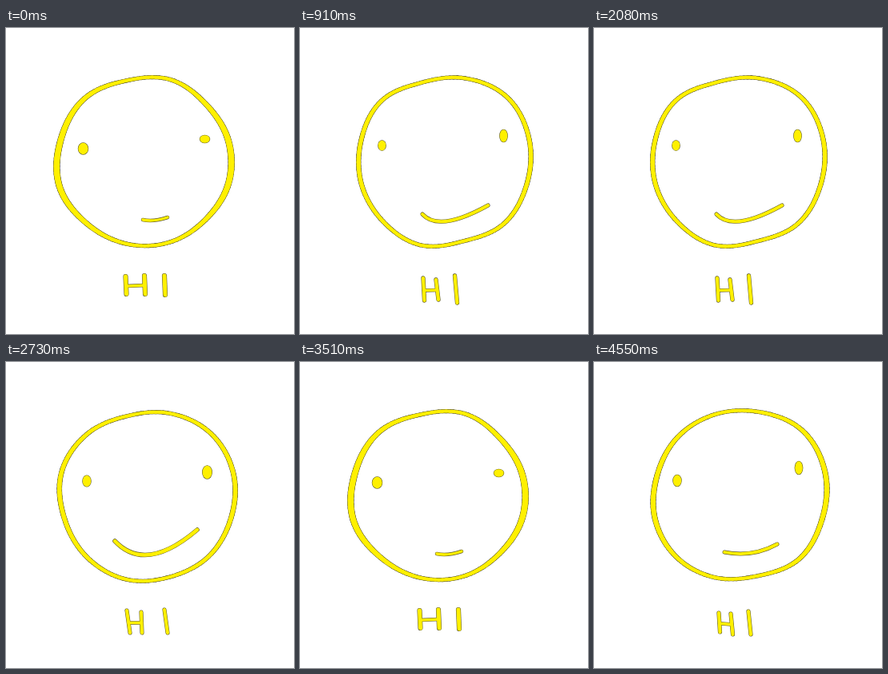
Animation of 360 by 383 pixels, one loop 4680 ms. Source, as an HTML page with a canvas:

```html
<!DOCTYPE html>
<html lang="en">
<head>
<meta charset="utf-8">
<title>Hi</title>
<style>
  html, body { margin: 0; width: 100%; height: 100%; overflow: hidden; background: #fff; }
  canvas { display: block; }
</style>
</head>
<body>
<canvas id="stage" width="360" height="383" role="img" aria-label="Smiling face saying HI"></canvas>
<script>
const ctx = document.getElementById('stage').getContext('2d');
const STEP = 130;
const CENTER = { x: 178, y: 168 };
const FIRST_BEARING = Math.PI / 12;
const YELLOW = '#fff000', EDGE = '#5e5a2c', EDGE_WIDTH = 1.1;

// radii: head outline at equal bearings, clockwise on screen
// eyes: x, y, rx, ry; mouth: start, control, end; stems: x, y, dx, dy
// pen: extra width on the head's flanks, mouth width, letter width
const calm = {
  radii: [103.5, 101.2, 103.6, 105.7, 108.7, 115.2, 113, 112.8, 105.8, 107, 102.2, 103.5],
  eyes: [96.5, 151, 6.2, 7.2, 248.5, 139, 6.2, 4.8],
  mouth: [171, 240, 184, 243, 202, 237],
  stems: [149.5, 311, 1, 22, 173, 310, 1, 23, 198, 310, 1, 24],
  pen: [3.3, 3.4, 5]
};
const grin = {
  radii: [106.8, 106.5, 104.5, 107.7, 108.2, 108.6, 112.6, 109.3, 103.8, 107.2, 110.8, 110],
  eyes: [101, 149, 5.2, 7, 251.5, 138, 5.9, 8.2],
  mouth: [136, 224, 174.5, 265, 239, 210],
  stems: [151, 311, 4, 28, 169, 313, 1, 26, 198, 310, 4, 29],
  pen: [1.5, 4.4, 4]
};
const smile = {
  radii: [109, 108.7, 102.2, 107.3, 104.8, 104.8, 105.2, 108.2, 103, 108.8, 114.8, 112.2],
  eyes: [102.5, 147, 4.8, 6.3, 254.5, 135, 4.8, 7.8],
  mouth: [153, 233, 174, 256, 235, 222],
  stems: [154, 313, 1.5, 28, 170, 315, 3, 25, 193.5, 310, 3, 34],
  pen: [1.2, 4, 4.2]
};
const smirk = {
  radii: [110.9, 111, 103.2, 105.2, 106.8, 105.5, 102.4, 104.2, 105.8, 109.2, 116.5, 114.8],
  eyes: [104, 148.5, 5.2, 7.2, 256, 132.5, 4.8, 8.2],
  mouth: [163, 238, 198, 245, 229, 228],
  stems: [156, 314, 1.5, 24, 171, 315, 2.5, 26, 193, 312, 3, 29],
  pen: [2, 3.8, 4.1]
};

function mix(a, b, t, lift = 0) {
  const pose = { lift };
  for (const key in a) pose[key] = a[key].map((v, i) => v + (b[key][i] - v) * t);
  return pose;
}

const poses = [
  calm,
  mix(calm, grin, 1 / 3, 5),
  mix(calm, grin, 2 / 3),
  grin,
  mix(grin, smile, 1 / 4),
  mix(grin, smile, 1 / 2),
  mix(grin, smile, 3 / 4),
  smile,
  smirk
];

// Catmull-Rom through a closed list of values
function sampleLoop(values, position) {
  const n = values.length, i = Math.floor(position), t = position - i;
  const [a, b, c, d] = [-1, 0, 1, 2].map(k => values[(i + k + n) % n]);
  return b + t / 2 * (c - a + t * (2 * a - 5 * b + 4 * c - d + t * (3 * (b - c) + d - a)));
}

function headPoint({ radii, lift = 0 }, position) {
  const angle = FIRST_BEARING + position / radii.length * 2 * Math.PI;
  const r = sampleLoop(radii, position) + lift * Math.max(0, -Math.sin(angle));
  return [CENTER.x + r * Math.cos(angle), CENTER.y + r * Math.sin(angle), Math.cos(angle) ** 2];
}

function line(x1, y1, x2, y2, width) {
  ctx.lineWidth = width;
  ctx.beginPath();
  ctx.moveTo(x1, y1);
  ctx.lineTo(x2, y2);
  ctx.stroke();
}

function drawHead(pose, extra) {
  const detail = 12, count = pose.radii.length * detail;
  let [x, y] = headPoint(pose, 0);
  for (let k = 1; k <= count; k++) {
    const [nextX, nextY, flank] = headPoint(pose, k / detail);
    line(x, y, nextX, nextY, 4 + pose.pen[0] * flank + extra);
    [x, y] = [nextX, nextY];
  }
}

function drawEyes({ eyes }, extra) {
  for (let i = 0; i < eyes.length; i += 4) {
    const [x, y, rx, ry] = eyes.slice(i, i + 4);
    ctx.beginPath();
    ctx.ellipse(x, y, rx + extra / 2, ry + extra / 2, 0, 0, 2 * Math.PI);
    ctx.fill();
  }
}

function drawMouth({ mouth, pen }, extra) {
  ctx.lineWidth = pen[1] + extra;
  ctx.beginPath();
  ctx.moveTo(mouth[0], mouth[1]);
  ctx.quadraticCurveTo(...mouth.slice(2));
  ctx.stroke();
}

function drawLetters({ stems, pen }, extra) {
  const along = (stem, t) => {
    const [x, y, dx, dy] = stems.slice(stem * 4, stem * 4 + 4);
    return [x + dx * t, y + dy * t];
  };
  for (let stem = 0; stem < 3; stem++) {
    line(...along(stem, 0), ...along(stem, 1), pen[2] + extra);
  }
  line(...along(0, 0.55), ...along(1, 0.52), 3.4 + extra);
}

function drawLayer(pose, color, extra) {
  ctx.strokeStyle = ctx.fillStyle = color;
  for (const draw of [drawHead, drawEyes, drawMouth, drawLetters]) draw(pose, extra);
}

function render(now) {
  const pose = poses[Math.floor(now / STEP) % poses.length];
  ctx.fillStyle = '#fff';
  ctx.fillRect(0, 0, 360, 383);
  ctx.lineCap = ctx.lineJoin = 'round';
  drawLayer(pose, EDGE, EDGE_WIDTH);
  drawLayer(pose, YELLOW, 0);
}

const start = performance.now();
function tick() {
  render(performance.now() - start);
  requestAnimationFrame(tick);
}
tick();
</script>
</body>
</html>
```
